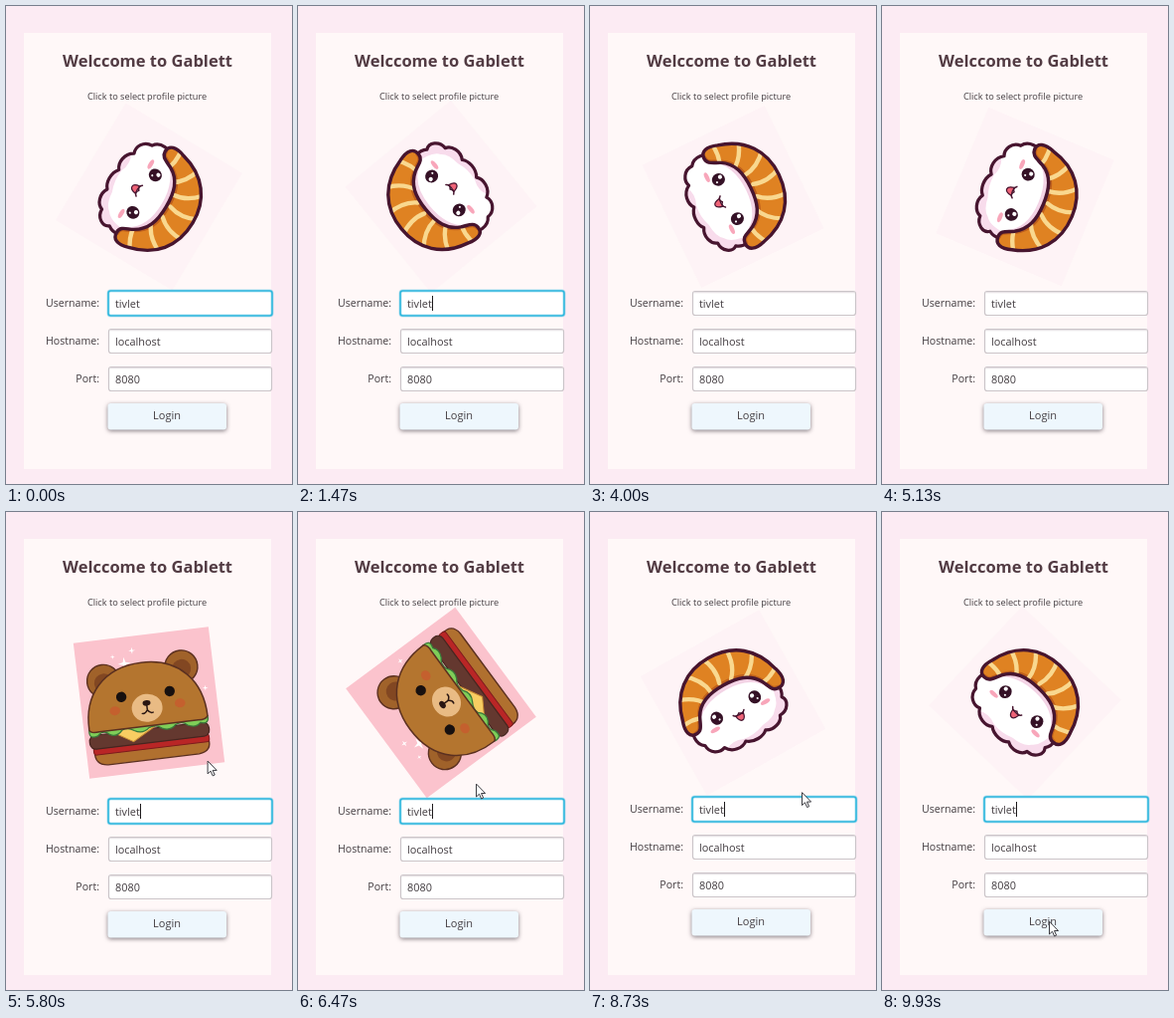
These frames come from a looping animation (288 px wide and 480 px high, 9.99 s). An HTML page with a canvas:

```html
<!DOCTYPE html>
<html lang="en">
<head>
<meta charset="utf-8">
<title>Login</title>
<style>
  html, body { margin: 0; width: 100%; height: 100%; overflow: hidden; background: #fcebf3; }
  canvas { display: block; width: 288px; height: 480px; }
</style>
</head>
<body>
<canvas id="stage"></canvas>
<script>
const LOOP = 9990, STEP = 66.6;
const FONT = '"Open Sans", "Noto Sans", sans-serif';
const INK = '#47152f', BROWN = '#5b3020';
const canvas = document.getElementById('stage');
const ctx = canvas.getContext('2d');
const ratio = window.devicePixelRatio || 1;
canvas.width = 288 * ratio;
canvas.height = 480 * ratio;

function text(str, x, y, size, align = 'left', color = '#423c40', weight = 400) {
  ctx.font = `${weight} ${size}px ${FONT}`;
  ctx.textAlign = align;
  ctx.fillStyle = color;
  ctx.fillText(str, x, y);
}

function paint(path, fill, stroke, width = 1) {
  if (fill) { ctx.fillStyle = fill; ctx.fill(path); }
  if (stroke) { ctx.strokeStyle = stroke; ctx.lineWidth = width; ctx.stroke(path); }
}

const shape = (d, fill, stroke, width) => paint(new Path2D(d), fill, stroke, width);

function oval(x, y, rx, ry, fill, stroke, width) {
  const p = new Path2D();
  p.ellipse(x, y, rx, ry, 0, 0, Math.PI * 2);
  paint(p, fill, stroke, width);
}

function box(x, y, w, h, r, fill, stroke, width) {
  const p = new Path2D();
  p.roundRect(x, y, w, h, r);
  paint(p, fill, stroke, width);
}

function sparkle(x, y, r) {
  const q = r * 0.2;
  shape(`M${x} ${y - r}L${x + q} ${y - q}L${x + r} ${y}L${x + q} ${y + q}L${x} ${y + r}` +
    `L${x - q} ${y + q}L${x - r} ${y}L${x - q} ${y - q}Z`, '#fff');
}

function drawSushi() {
  box(-68.5, -68.5, 137, 137, 0, '#fef3f6');
  ctx.scale(0.95, 0.95);
  // rice with a bumpy lower edge
  const rice = 'M-46 -2C-56 6 -56 20 -48 25C-48 35 -38 40 -31 37C-26 46 -14 47 -8 42' +
    'C-1 48 11 47 16 42C24 47 35 43 37 36C47 36 53 26 48 20C54 12 50 2 44 -4L20 -28L-24 -28Z';
  shape(rice, '#fff');
  ctx.save();
  ctx.clip(new Path2D(rice));
  shape('M-30 40Q-20 34 -9 39Q3 41 16 36Q30 35 35 28Q44 22 44 0L60 10L50 50L-30 50Z', '#f8dcec');
  shape('M-46 4Q-32 -18 0 -18Q32 -18 43 4', null, '#f3d3e5', 5);
  ctx.restore();
  shape(rice, null, INK, 3.4);

  const fish = 'M-50 10C-58 10 -60 2 -56 -9C-49 -38 -28 -54 0 -54C30 -54 50 -37 57 -9' +
    'C61 3 58 10 50 10C42 10 42 3 38 -4C30 -17 18 -21 0 -21C-18 -21 -31 -17 -38 -4C-42 4 -43 10 -50 10Z';
  shape(fish, '#df8222');
  ctx.save();
  ctx.clip(new Path2D(fish));
  shape('M-50 10C-43 10 -42 4 -38 -4C-30 -18 -18 -22 0 -22C18 -22 30 -18 38 -4C42 3 42 10 50 10', null, '#bf601c', 6);
  for (const a of [-79, -52, -27, -3, 22, 47, 75]) {
    ctx.save();
    ctx.translate(0, 6);
    ctx.rotate(a * Math.PI / 180);
    shape('M-3 -64Q5 -46 -1 -31', null, '#f9d88f', 4.6);
    ctx.restore();
  }
  ctx.restore();
  shape(fish, null, INK, 3.6);

  for (const x of [-23, 23]) {
    oval(x, 6, 6.6, 7, '#351126');
    oval(x - 1.8, 3.3, 2.2, 2.2, '#fff');
    oval(x + 2, 8.6, 1.1, 1.1, '#fff');
    oval(x * 1.32, 16, 5.5, 2.3, '#f8a6ba');
  }
  shape('M-4.5 14Q0 15 4.5 14Q3.5 21 0 21Q-3.5 21 -4.5 14Z', '#ef6478', INK, 1.3);
  shape('M-6.5 12Q-3.5 16 0 12.5Q3.5 16 6.5 12', null, INK, 1.6);
}

function drawBear() {
  box(-68.5, -68.5, 137, 137, 0, '#fbc3cd');
  sparkle(-20, -42, 6.5);
  sparkle(-11, -54, 3.5);
  sparkle(-31, -50, 2.5);
  sparkle(58, -8, 3);
  for (const [x, y] of [[-43, -27], [36.5, -32]]) {
    oval(x, y, 16.5, 16.5, '#a0622a', BROWN, 1.4);
    oval(x, y + 2, 9.5, 9.5, '#824722');
  }
  // filling and lower bun
  shape('M-60 42H55Q58 56 44 57H-48Q-62 56 -60 42Z', '#b0702f', BROWN, 1.4);
  box(-61, 38, 117, 8, 3, '#b92626', '#7d1b1d', 1);
  box(-64, 26, 121, 14, 6, '#64382f', '#462620', 1.2);
  shape('M-45 22H7L-20 37Z', '#f8cd62', '#c88b32', 1);
  shape('M-63 20Q-65 30 -55 27Q-49 21 -43 27Q-36 31 -30 24Q-24 22 -18 26Q-10 31 -3 25' +
    'Q4 22 10 27Q18 31 24 25Q31 22 36 27Q44 31 49 26Q58 29 57 20Z', '#7fce58', '#39793b', 1.3);

  shape('M-63 20C-64 -14 -43 -41 -3 -41C36 -41 57 -15 57 20Q55 24 47 23H-53Q-62 24 -63 20Z', '#b4752f', BROWN, 1.5);
  oval(-2.5, 5, 15.5, 14, '#e9bb84');
  for (const x of [-27, 22]) oval(x, -9, 5.2, 5.2, '#17100f');
  for (const x of [-35, 31]) oval(x, 4, 5.3, 4.5, '#c4602e');
  oval(-2.5, 0, 4, 2.8, '#2b1712');
  shape('M-2.5 1V7M-8 10Q-5 11 -2.5 7Q0 11 3 10', null, '#2b1712', 1.5);
}

// [start, end, focus blink origin]
const FOCUS = [[0, 3400, 250], [5400, 7350, 5400], [8500, LOOP, 8500]];

// [time, x, y] of the pointer tip in each visible stretch
const POINTER = [
  [[1800, 205, -20], [2050, 185, 70], [2600, 168, 135], [3400, 168, 137]],
  [[5450, 214, 235], [6200, 188, 269], [6470, 179, 273], [6900, 165, 235], [7300, 182, 215], [7600, 222, 250], [7900, 222, 250]],
  [[8500, 222, 250], [9200, 185, 380], [9700, 168, 411], [LOOP, 168, 411]]
];

function drawPointer(t) {
  const path = POINTER.find(p => t >= p[0][0] && t < p[p.length - 1][0]);
  if (!path) return;
  const i = path.findIndex(p => p[0] > t);
  const [t0, x0, y0] = path[i - 1], [t1, x1, y1] = path[i];
  const u = (t - t0) / (t1 - t0), e = u * u * (3 - 2 * u);
  ctx.save();
  ctx.translate(x0 + (x1 - x0) * e, y0 + (y1 - y0) * e);
  shape('M.5 .5V13L3.5 10.2L5.6 15L7.6 14.1L5.5 9.5H9.2Z', '#fff', '#3c3c42', 1);
  ctx.restore();
}

function field(label, value, y, focused) {
  text(label, 94, y + 16, 10.6, 'right');
  if (focused) {
    box(103, y, 165, 25, 2.5, '#fff', 'rgba(70,190,225,.4)', 3);
    box(103, y, 165, 25, 2.5, null, '#31b8de', 1.6);
  } else {
    box(103.5, y + 0.5, 164, 24, 2.5, '#fff', '#cbc5c9', 1.2);
    shape(`M105 ${y + 1.7}H266`, null, '#e6e1e4', 1.2);
  }
  text(value, 110, y + 17, 10.9);
}

function drawForm(t, dy) {
  const focus = FOCUS.find(f => t >= f[0] && t < f[1]);
  ctx.save();
  ctx.translate(0, dy);
  field('Username:', 'tivlet', 286, focus);
  field('Hostname:', 'localhost', 324);
  field('Port:', '8080', 362);
  if (focus && (t - focus[2] + 1000) % 1000 < 500) {
    ctx.fillStyle = '#1d1a1c';
    ctx.fillRect(135, 291, 1, 15);
  }
  ctx.save();
  ctx.shadowColor = 'rgba(50,40,50,.6)';
  ctx.shadowBlur = 4 * ratio;
  ctx.shadowOffsetY = 1.2 * ratio;
  box(102.5, 399, 119.5, 26.5, 3, '#eef7fd');
  ctx.restore();
  text('Login', 162, 415.2, 11, 'center');
  ctx.restore();
}

function draw(t) {
  const bear = t >= 5400 && t < 8500;
  ctx.setTransform(ratio, 0, 0, ratio, 0, 0);
  ctx.lineJoin = ctx.lineCap = 'round';
  box(0, 0, 288, 480, 0, '#fcebf3');
  box(18, 27, 249, 438, 0, '#fff8f8');
  text('Welccome to Gablett', 142.5, 61, 16.5, 'center', '#523b43', 700);
  text('Click to select profile picture', 142, 94, 9.2, 'center');

  // about one turn per second after a short rest
  const degrees = Math.max(121, 62 + t * 0.3609);
  ctx.save();
  ctx.translate(144, 191.5);
  ctx.rotate(degrees * Math.PI / 180);
  if (bear) drawBear(); else drawSushi();
  ctx.restore();

  drawForm(t, bear ? 2 : 0);
  drawPointer(t);
}

const start = performance.now();
function tick() {
  const t = (performance.now() - start) % LOOP;
  draw(Math.floor(t / STEP) * STEP);
  requestAnimationFrame(tick);
}
tick();
</script>
</body>
</html>
```
